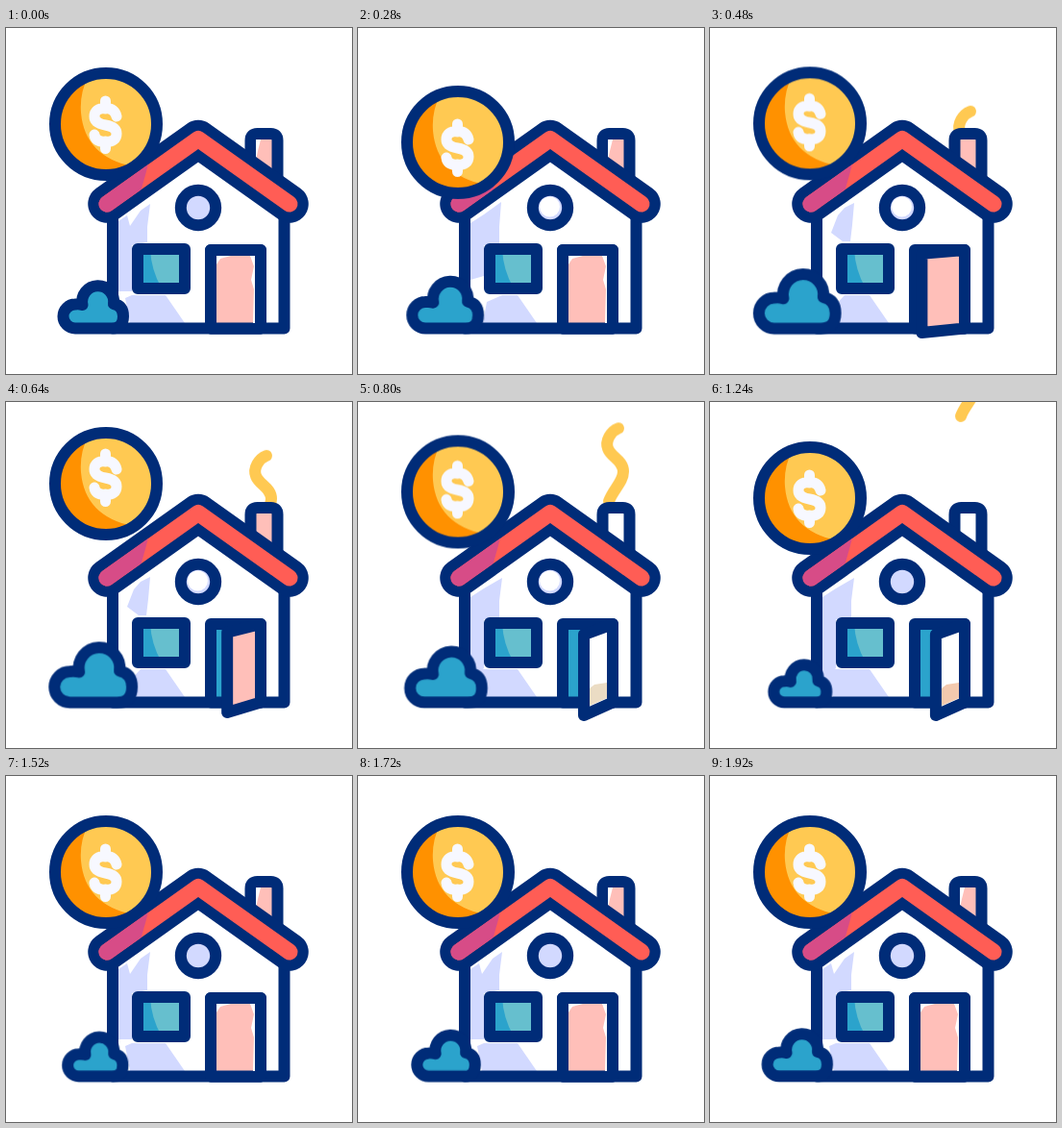
Recreate the animation shown at these times as an HTML page. Size 360 px wide and 360 px high, loop 2 s.

```html
<!DOCTYPE html>
<html lang="en">
<head>
<meta charset="utf-8">
<title>House and coin</title>
<style>
  html, body { margin: 0; width: 100%; height: 100%; overflow: hidden; background: #fff; }
  svg { display: block; width: 100vw; height: 100vh; }

  .line { stroke: #002c78; stroke-width: 12; stroke-linejoin: round; stroke-linecap: round; }
  .none { fill: none; }
  .white { fill: #fff; }
  .teal { fill: #2ba3cc; }
  .lilac { fill: #d2d9ff; }
  .roof { fill: none; stroke-linejoin: round; stroke-linecap: round; }

  .coin, .dollar, .bush, .smoke, .panel, .pale, .nicks, .patch, .glint, .shade {
    animation: 2s linear infinite;
  }
  .coin { animation-name: coin; animation-timing-function: ease-in-out; }
  .dollar { animation-name: dollar; animation-timing-function: ease-in-out; }
  .bush { animation-name: bush; animation-timing-function: ease-in-out; transform-origin: 91px 312px; }
  .bush path { vector-effect: non-scaling-stroke; }
  .smoke { animation-name: smoke; }
  .panel { animation-name: swing, pale; animation-timing-function: linear, step-end; }
  .pale { animation-name: pale; animation-timing-function: step-end; }
  .nicks { animation-name: nicks; animation-timing-function: step-end; }
  .patch { animation-name: patch; animation-timing-function: step-end; }
  .glint { animation-name: glint; animation-timing-function: step-end; }
  .shade { animation-name: shade; animation-timing-function: step-end; }

  @keyframes coin {
    0%, 4% { transform: translateY(0); }
    14.5% { transform: translateY(19px); }
    32% { transform: translateY(-15px); }
    47%, 100% { transform: translateY(0); }
  }
  @keyframes dollar {
    0%, 4% { transform: translateY(0); }
    14.5% { transform: translateY(5px); }
    32% { transform: translateY(-7px); }
    47%, 100% { transform: translateY(0); }
  }
  @keyframes bush {
    0%, 4%, 100% { transform: translateX(0) scale(1); }
    29% { transform: translateX(0) scale(1.3); }
    61% { transform: translateX(3px) scale(.88); }
  }
  @keyframes smoke {
    0%, 17% { transform: translateY(58px); }
    32% { transform: translateY(0); }
    48% { transform: translateY(-57px); }
    62% { transform: translateY(-117px); }
    70%, 100% { transform: translateY(-150px); }
  }
  @keyframes swing {
    0%, 18%, 74%, 100% { d: path("M213 231L265 231L265 312.5L213 312.5Z"); }
    36%, 62% { d: path("M235 242L265 231L265 312.5L235 326Z"); }
  }
  @keyframes pale {
    0%, 70% { fill: #ffbfb9; }
    34% { fill: #fff; }
  }
  @keyframes nicks {
    0%, 74% { opacity: 1; }
    18% { opacity: 0; }
  }
  @keyframes patch {
    0%, 66% { opacity: 0; fill: #ebdcc4; }
    38% { opacity: 1; fill: #ebdcc4; }
    56% { opacity: 1; fill: #f3c9ae; }
  }
  @keyframes glint {
    0%, 44% { opacity: 0; }
    6% { opacity: 1; }
  }
  @keyframes shade {
    0%, 66% { d: path("M117 201L126 195L129 206L140 190L150 183L147 207V223L131 226V274H117ZM124 281L131 278H166L186 307H129Z"); }
    8% { d: path("M117 203L131 194L149 181L147 207V225L131 226V258L117 262ZM150 278H166L186 307H130L134 285Z"); }
    24% { d: path("M150 182L148 205L146 222H138L126 213L133 195L140 187ZM140 278H166L186 307H135L131 288Z"); }
    40% { d: path("M117 203L131 194L150 183L147 207V225L131 226V277L117 290ZM128 278H166L186 307H128L117 290Z"); }
  }
</style>
</head>
<body>
<svg viewBox="0 0 360 360">
  <defs>
    <clipPath id="sky"><path d="M0 0H360V107H0Z"/></clipPath>
    <clipPath id="dim"><path d="M80 90H160Q149 145 128 210H80Z"/></clipPath>
    <clipPath id="face"><circle cx="104" cy="100" r="50"/></clipPath>
    <path id="gable" d="M105 183L200 115.500L295 183"/>
  </defs>

  <g clip-path="url(#sky)">
    <path class="smoke none" stroke="#ffc952" stroke-width="12" stroke-linecap="round"
      d="M271 56C263 59 257 69 260 77C263 86 276 89 276 101C276 112 265 120 261 132"/>
  </g>

  <path class="pale line" d="M254.500 165V117Q254.500 110 261.500 110H275.500Q282.500 110 282.500 117V165Z"/>
  <path class="nicks white" d="M260 116H265L262 128L260 138Z"/>

  <path class="white" d="M111 185L200 122L289.500 185V312H111Z"/>
  <path class="shade lilac" d="M117 203L150 183L143 224L131 226V262L117 290Z"/>
  <path class="line none" d="M111 190V312.500H289.500V190"/>

  <use href="#gable" class="roof" stroke="#002c78" stroke-width="39.500"/>
  <use href="#gable" class="roof" stroke="#ff5d55" stroke-width="17"/>
  <g clip-path="url(#dim)">
    <use href="#gable" class="roof" stroke="#d74c87" stroke-width="17"/>
  </g>

  <circle class="line lilac" cx="200" cy="187" r="18.200"/>
  <circle class="glint white" cx="199.500" cy="186" r="10.500"/>

  <path fill="#66bfce" d="M137 230H186V271H137Z"/>
  <path class="teal" d="M137 230H150Q151 252 162 271H137Z"/>
  <path class="line none" d="M137 230H186V271H137Z"/>

  <path class="line teal" d="M213 231H265V312.500H213Z"/>
  <path class="panel line" d="M213 231L265 231L265 312.500L213 312.500Z"/>
  <path class="nicks white" d="M254 237H259V307H257L258 272L255 262L258 248ZM219 237H234L223 240L219 246Z"/>
  <path class="patch" d="M241 298L246 294L259 292V308L241 316Z"/>

  <g class="bush">
    <path class="line teal" d="M72 312.500A12.500 12.500 0 0 1 72 287.500Q76 287 79.500 288A16.500 16.500 0 1 1 112 287Q122 289 122 300Q122 312.500 110 312.500Z"/>
  </g>

  <g class="coin">
    <circle cx="104" cy="100" r="53" fill="#ffc952"/>
    <path clip-path="url(#face)" fill="#ff9100" d="M40 40H92Q76 62 78 88Q82 134 132 144V165H40Z"/>
    <circle class="line none" cx="104" cy="100" r="53"/>
    <path class="dollar none" stroke="#f7f8ff" stroke-width="11" stroke-linecap="round" stroke-linejoin="round"
      d="M115 92Q113 83.500 103.500 83.500Q92 83.500 92 92Q92 99 103.500 101Q115 103 115 110Q115 118.500 103.500 118.500Q93 118.500 92 111M103.500 76V84M103.500 118V125.500"/>
  </g>
</svg>
</body>
</html>
```
